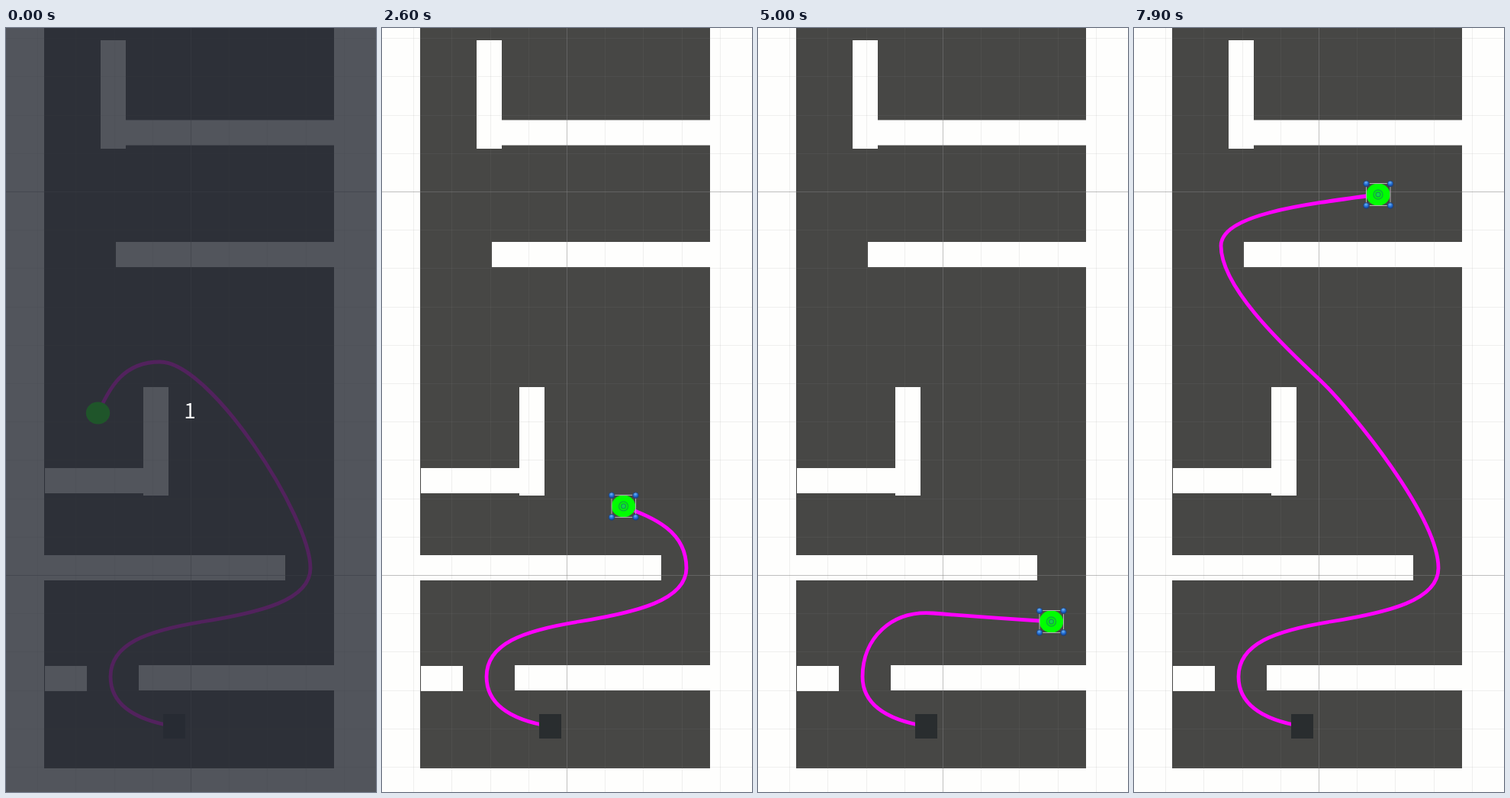
Write an HTML page that moves like this. It is 485x1000 px and loops after 8000 ms.

```html
<!DOCTYPE html>
<html lang="en">
<head>
<meta charset="utf-8">
<title>Path planning</title>
<style>
  html, body { margin: 0; width: 100%; height: 100%; overflow: hidden; background: #fefefd; }
  svg { display: block; width: 485px; height: 1000px; }
  #count { font: 28px "Noto Sans CJK JP", "Noto Sans CJK SC", "DejaVu Sans", sans-serif; fill: #f4f4f5; text-anchor: middle; }
</style>
</head>
<body>
<svg viewBox="0 0 485 1000">
  <defs>
    <radialGradient id="knob" cx=".45" cy=".3" r=".7">
      <stop offset="0" stop-color="#6fb4f5"/>
      <stop offset=".55" stop-color="#1f69cf"/>
      <stop offset="1" stop-color="#0d3f94"/>
    </radialGradient>
  </defs>
  <rect width="485" height="1000" fill="#fefefd"/>
  <rect x="50" width="380" height="969" fill="#474745"/>
  <g id="walls" fill="#fefefd"></g>
  <g id="grid" fill="#808080"></g>
  <path id="route" fill="none" stroke="#f0f" stroke-width="4.8"/>
  <g id="goal">
    <ellipse rx="15.7" ry="14.4" fill="#0f0"/>
    <g id="gizmo" fill="none">
      <rect x="-15.5" y="-14.5" width="31.5" height="29" stroke="#b4b4b4"/>
      <circle r="6" stroke="#0fae3c" stroke-width="1.4"/>
      <circle r="3" stroke="#12a548" stroke-width="1.4" fill="#18d050"/>
    </g>
  </g>
  <rect x="206" y="898" width="29" height="32" fill="#292d2f"/>
  <g id="veil">
    <rect width="485" height="1000" fill="#272b35" fill-opacity=".8"/>
    <text id="count" x="241" y="511">1</text>
  </g>
</svg>
<script>
const $ = id => document.getElementById(id);
const LOOP = 8000, STEP = 100;

function add(parent, tag, attrs) {
  const el = document.createElementNS('http://www.w3.org/2000/svg', tag);
  for (const k in attrs) el.setAttribute(k, attrs[k]);
  parent.append(el);
}
const box = (parent, x, y, width, height, opacity = 1) =>
  add(parent, 'rect', { x, y, width, height, 'fill-opacity': opacity });

// horizontal walls: left, right, top; then the two upright ones
[[156, 430, 120.5], [144, 430, 280], [51, 181, 576], [50, 366, 690], [51, 106, 835], [174, 430, 834]]
  .forEach(([l, r, y]) => box($('walls'), l, y, r - l, 33));
[[124, 16], [180, 470]].forEach(([x, y]) => box($('walls'), x, y, 33, 142));

for (let i = -4; i <= 4; i++)
  box($('grid'), Math.round(241.9 + i * 50.2), 0, 1, 1000, i ? .12 : .5);
for (let i = -4; i <= 15; i++)
  box($('grid'), 0, Math.round(213.9 + i * 50.2), 485, 1, i % 10 ? .12 : .5);

for (const cx of [-15.5, 16]) for (const cy of [-14.2, 14.5])
  add($('gizmo'), 'circle', { cx, cy, r: 3.9, fill: 'url(#knob)', stroke: '#2a4268', 'stroke-width': .9 });

// key points of the drag: step, x, y
const drag = [
  [16, 120.5, 504], [20, 163.5, 425.5], [22, 240, 440], [25, 352, 613],
  [29, 125, 645], [32, 125, 645], [33, 157.5, 645], [36, 345, 655],
  [38, 404, 715], [41, 231, 767], [44, 112, 775], [45, 112, 775],
  [50, 384.5, 777], [52, 400, 705], [54, 372, 612], [60, 220, 451],
  [63, 178, 413], [67, 113, 503], [70, 132.5, 481], [72, 51, 334],
  [74, 80, 245], [79, 320, 218]
];

// slope that never overshoots: harmonic mean of both sides, flat at turns
function slope(i, axis) {
  if (!drag[i - 1] || !drag[i + 1]) return 0;
  const rate = j => (drag[j + 1][axis] - drag[j][axis]) / (drag[j + 1][0] - drag[j][0]);
  const a = rate(i - 1), b = rate(i);
  return a * b > 0 ? 2 * a * b / (a + b) : 0;
}

function goalAt(step) {
  const s = Math.max(step, drag[0][0]);
  const i = Math.max(0, drag.findIndex(p => p[0] >= s) - 1);
  const [a, b] = [drag[i], drag[i + 1]];
  const span = b[0] - a[0], k = (s - a[0]) / span, m = 1 - k;
  return [1, 2].map(n =>
    a[n] * m * m * (1 + 2 * k) + b[n] * k * k * (3 - 2 * k) +
    span * k * m * (slope(i, n) * m - slope(i + 1, n) * k));
}

// bends on the way to the robot: place, longest handle, and when the route needs them
const bends = [
  { x: 114, y: 285, dx: 0, dy: 60, when: (x, y) => x > 100 && y < 300 },
  { x: 248, y: 465, dx: 34, dy: 33, when: (x, y) => y < 300 || y < 440 && x < 220 },
  { x: 202, y: 437, dx: 66, dy: 0, when: (x, y) => x < 200 && y >= 440 && y < 600 },
  { x: 280, y: 636, dx: 66, dy: 0, when: (x, y) => x < 240 && y > 600 && y < 690 },
  { x: 399, y: 707, dx: 0, dy: 68, when: (x, y) => y < 690 },
  { x: 258, y: 777, dx: -75, dy: 12, when: (x, y) => y < 740 },
  { x: 230, y: 766, dx: -75, dy: -6, when: (x, y) => y >= 740 && x > 240 },
  { x: 137, y: 849, dx: 0, dy: 60, when: () => true },
  { x: 220, y: 914, dx: 48, dy: 8, when: () => true }
];

// handle of bend p on the side facing q
function handle(p, q, side) {
  const reach = p.dx ? Math.abs((q.x - p.x) / p.dx) : Math.abs((q.y - p.y) / p.dy);
  const k = side * Math.min(1, .6 * reach);
  return [p.x + p.dx * k, p.y + p.dy * k];
}

function routeFrom(x, y) {
  let from = { x, y }, d = `M${x} ${y}`;
  for (const to of bends.filter(b => b.when(x, y))) {
    const end = handle(to, from, -1);
    const start = 'dx' in from ? handle(from, to, 1) : [(x + end[0]) / 2, (y + end[1]) / 2];
    d += `C${[...start, ...end, to.x, to.y].join(' ')}`;
    from = to;
  }
  return d;
}

const show = (id, on) => $(id).setAttribute('visibility', on ? 'visible' : 'hidden');

function draw(ms) {
  const s = Math.floor(ms / STEP);
  const [x, y] = goalAt(s);
  $('goal').setAttribute('transform', `translate(${x} ${y})`);
  $('route').setAttribute('d', routeFrom(x, y));
  show('route', s < 59 || s > 61);
  show('gizmo', s >= 11);
  show('veil', s < 1);
}

const t0 = performance.now();
function tick() {
  draw((performance.now() - t0) % LOOP);
  requestAnimationFrame(tick);
}
tick();
</script>
</body>
</html>
```
